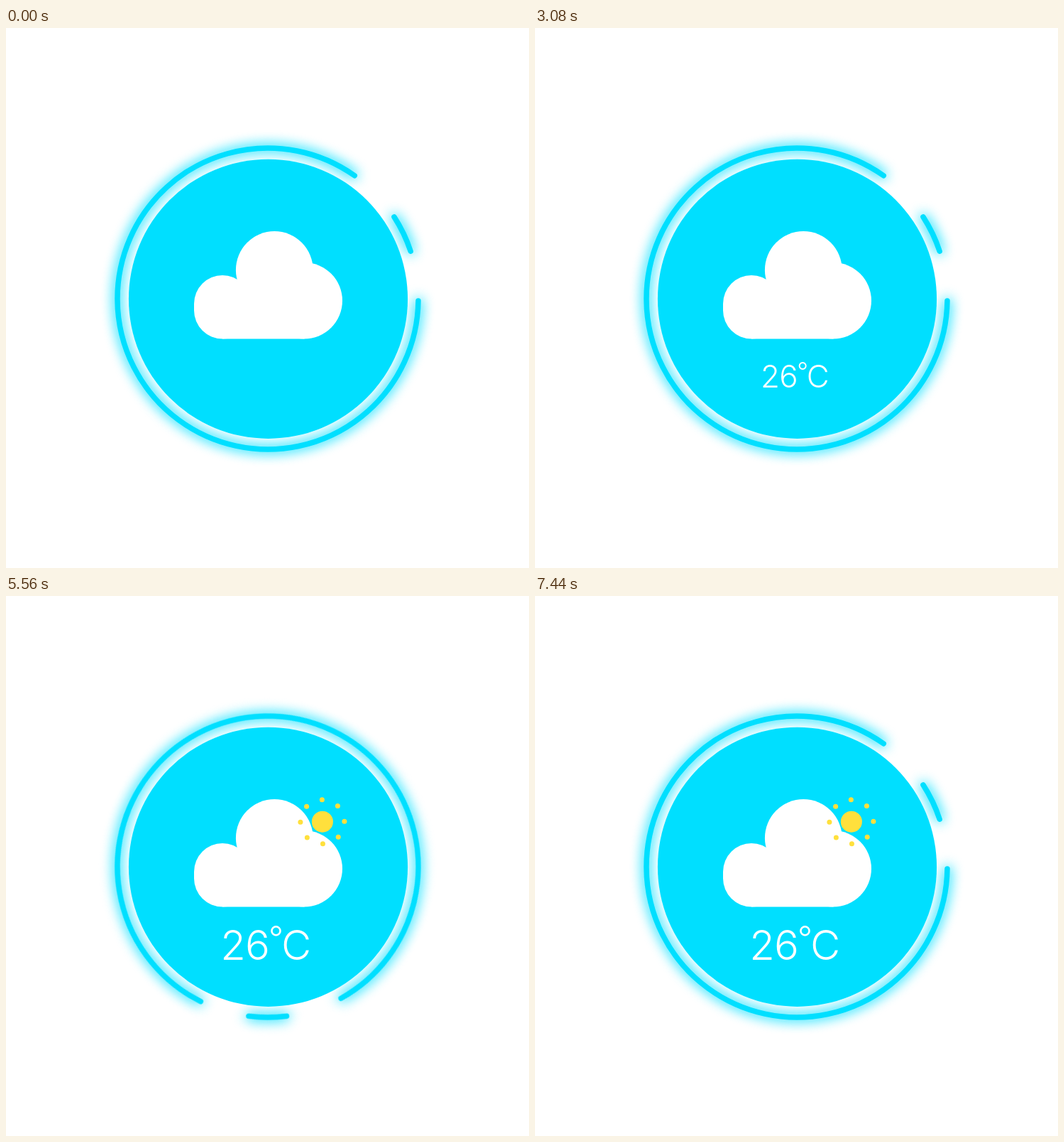
An HTML page for the animation above (7.52 s loop, 737x760 px).

```html
<!DOCTYPE html>
<html lang="en">
<head>
<meta charset="utf-8">
<title>Weather badge</title>
<style>
  html, body { margin: 0; width: 100%; height: 100%; overflow: hidden; background: #fff; }
  svg { display: block; width: 737px; height: 760px; }
  text { font: 300 58px Inter, "Helvetica Neue", Roboto, sans-serif; fill: #fff; text-anchor: middle; }
  .degree { font-size: 46px; }
</style>
</head>
<body>
<svg viewBox="0 0 737 760">
  <defs>
    <filter id="glow" filterUnits="userSpaceOnUse" x="-260" y="-260" width="520" height="520" color-interpolation-filters="sRGB">
      <feGaussianBlur stdDeviation="9"/>
      <feComponentTransfer result="halo"><feFuncA type="linear" slope="1.5"/></feComponentTransfer>
      <feMerge><feMergeNode in="halo"/><feMergeNode in="SourceGraphic"/></feMerge>
    </filter>
  </defs>

  <g transform="translate(369 381)">
    <g id="ring" filter="url(#glow)" fill="none" stroke="#00dfff" stroke-width="7.5" stroke-linecap="round"></g>
  </g>
  <circle cx="369.5" cy="381.3" r="196.6" fill="#00dfff"/>

  <g id="cloud" fill="#fff">
    <rect x="265" y="348" width="80" height="89.5" rx="40"/>
    <circle cx="378.3" cy="340.5" r="54.4"/>
    <circle cx="420.3" cy="383.8" r="53.7"/>
    <rect x="305" y="370" width="115.5" height="67.5"/>
  </g>

  <g id="label">
    <text y="511.5"><tspan x="320">2</tspan><tspan x="354.5">6</tspan><tspan class="degree" x="380.5" y="498">°</tspan><tspan x="409" y="511.5">C</tspan></text>
  </g>

  <g transform="translate(445.9 317.7)">
    <g id="sun" fill="#ffe03c"><circle r="15"/></g>
  </g>
</svg>
<script>
  const STEP = 40, STEPS = 188;
  const byId = id => document.getElementById(id);
  const ring = byId('ring'), cloud = byId('cloud'), label = byId('label'), sun = byId('sun');

  function add(parent, tag, attrs) {
    const el = document.createElementNS('http://www.w3.org/2000/svg', tag);
    for (const key in attrs) el.setAttribute(key, attrs[key]);
    parent.append(el);
  }

  const polar = (r, deg) => {
    const a = deg * Math.PI / 180;
    return [r * Math.cos(a), r * Math.sin(a)];
  };

  function addArc(from, to) {
    const r = 212, large = to - from > 180 ? 1 : 0;
    add(ring, 'path', { d: `M${polar(r, from)} A${r} ${r} 0 ${large} 1 ${polar(r, to)}` });
  }
  addArc(0.8, 305.2);
  addArc(-32.9, -18.4);

  for (let i = 0; i < 8; i++) {
    const [cx, cy] = polar(31, i * 45 - 1);
    add(sun, 'circle', { cx, cy, r: 3.5 });
  }

  const progress = (n, from, to) => Math.min(1, Math.max(0, (n - from) / (to - from)));
  const mix = (a, b, u) => a + (b - a) * u;
  const show = (el, on) => el.setAttribute('visibility', on ? 'visible' : 'hidden');

  function draw(n) {
    // The cloud dims and comes back.
    cloud.setAttribute('opacity', Math.abs(1 - 2 * progress(n, 0, 54)));

    // The temperature grows about its centre.
    const size = mix(0.589, 1, progress(n, 64, 96));
    label.setAttribute('transform', `translate(367 488) scale(${size}) translate(-367 -488)`);
    show(label, n >= 64);

    // The sun fades in while turning once.
    const rise = progress(n, 103, 123);
    sun.setAttribute('transform', `rotate(${360 * rise})`);
    sun.setAttribute('opacity', mix(0.25, 1, rise));
    show(sun, n >= 103);

    // The ring makes two full turns.
    ring.setAttribute('transform', `rotate(${720 * progress(n, 130, 186)})`);
  }

  const start = performance.now();
  let last = -1;
  function tick() {
    const n = Math.floor((performance.now() - start) / STEP) % STEPS;
    if (n !== last) draw(last = n);
    requestAnimationFrame(tick);
  }
  tick();
</script>
</body>
</html>
```
